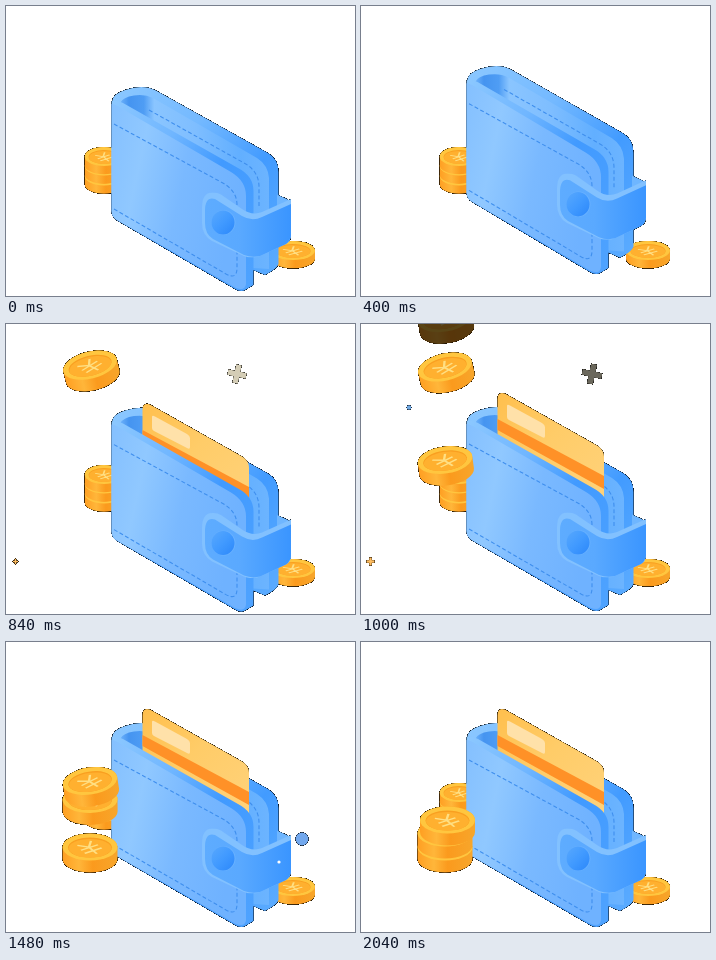
Recreate the animation shown at these times as an HTML page. Size 349 by 290 pixels, loop 3.04 s.

```html
<!DOCTYPE html>
<html lang="en">
<head>
<meta charset="utf-8">
<title>Wallet and coins</title>
<style>
  html, body { margin: 0; width: 100%; height: 100%; overflow: hidden; background: #fff; }
  svg { display: block; width: 349px; height: 290px; }
  .stitch { fill: none; stroke: #3f8fee; stroke-width: 1.1; stroke-dasharray: 4 2.4; }
</style>
</head>
<body>
<svg viewBox="0 0 349 290">
  <defs>
    <!-- Puts black under every partly transparent pixel: dark rims and dark fades. -->
    <filter id="matte" filterUnits="userSpaceOnUse" x="0" y="0" width="349" height="290" color-interpolation-filters="sRGB">
      <feComponentTransfer in="SourceAlpha" result="black">
        <feFuncA type="discrete" tableValues="0 1 1 1 1 1 1 1 1 1"/>
      </feComponentTransfer>
      <feMerge><feMergeNode in="black"/><feMergeNode in="SourceGraphic"/></feMerge>
    </filter>
    <linearGradient id="face" x1="0" y1="0" x2="1" y2=".3">
      <stop offset="0" stop-color="#84c0ff"/><stop offset=".28" stop-color="#90c8ff"/>
      <stop offset=".6" stop-color="#7ab9ff"/><stop offset="1" stop-color="#6fb2ff"/>
    </linearGradient>
    <linearGradient id="back" x1="0" y1="0" x2="1" y2="1">
      <stop offset="0" stop-color="#8cc8ff"/><stop offset=".35" stop-color="#74b9ff"/>
      <stop offset=".65" stop-color="#429bff"/><stop offset="1" stop-color="#5cacff"/>
    </linearGradient>
    <linearGradient id="inside">
      <stop offset="0" stop-color="#6db2fb"/><stop offset=".06" stop-color="#4594f0"/>
      <stop offset=".16" stop-color="#4f9df4"/><stop offset=".23" stop-color="#8ac5ff"/>
      <stop offset=".5" stop-color="#7fbeff"/><stop offset=".8" stop-color="#62afff"/>
      <stop offset="1" stop-color="#6cb4ff"/>
    </linearGradient>
    <linearGradient id="rim" x1="0" y1="0" x2="1" y2="1">
      <stop offset="0" stop-color="#8cc8ff"/><stop offset=".3" stop-color="#70b6ff"/>
      <stop offset=".55" stop-color="#419aff"/><stop offset="1" stop-color="#4fa3ff"/>
    </linearGradient>
    <linearGradient id="strap">
      <stop offset="0" stop-color="#5eacff"/><stop offset=".4" stop-color="#5aa9ff"/>
      <stop offset=".58" stop-color="#50a3ff"/><stop offset="1" stop-color="#3a95ff"/>
    </linearGradient>
    <linearGradient id="button" x1="0" y1="0" x2="1" y2="1">
      <stop offset="0" stop-color="#58a8fd"/><stop offset=".5" stop-color="#419aff"/>
      <stop offset="1" stop-color="#2b87fa"/>
    </linearGradient>
    <linearGradient id="card" x1="0" y1="0" x2="1" y2="1">
      <stop offset="0" stop-color="#ffbf4d"/><stop offset=".45" stop-color="#ffcc68"/>
      <stop offset="1" stop-color="#ffd27a"/>
    </linearGradient>
    <linearGradient id="side">
      <stop offset="0" stop-color="#ff9f22"/><stop offset=".3" stop-color="#ffb63a"/>
      <stop offset=".55" stop-color="#fb9a1d"/><stop offset="1" stop-color="#f7a62b"/>
    </linearGradient>
    <g id="coin">
      <path fill="url(#side)" d="M-27.500,0A27.500,13.500 0 0 1 27.500,0V12A27.500,13.500 0 0 1 -27.500,12Z"/>
      <ellipse rx="27.500" ry="13.500" fill="#ffc63f"/>
      <ellipse cy=".6" rx="22" ry="10" fill="#f99f20"/>
      <ellipse cy="1.3" rx="21.500" ry="9.300" fill="#ffb02f"/>
      <path transform="translate(0 1) scale(1 .52) rotate(-32)" fill="none" stroke="#ffdf83" stroke-width="2.4"
        d="M-8,-11L0,-2L8,-11M0,-2V13M-10,-1H10M-10,6H10"/>
    </g>
    <path id="cross" d="M-.3,-1H.3V-.3H1V.3H.3V1H-.3V.3H-1V-.3H-.3Z"/>
    <circle id="dot" r="1"/>
  </defs>

  <g filter="url(#matte)">
    <use href="#coin" transform="translate(98 170) scale(.7)"/>
    <use href="#coin" transform="translate(98 160) scale(.7)"/>
    <use href="#coin" transform="translate(98 150.5) scale(.7)"/>
    <use href="#coin" transform="translate(287 244.5) scale(.8 .7)"/>

    <g id="wallet">
      <path fill="url(#back)" d="M106,96Q106,88 119,84Q137,78 150,84.500L262,147Q272.500,153 272.500,166V258Q271,263 259,269L247,264L200,220L106,120Z"/>
      <path fill="url(#inside)" d="M114,97Q117,91 128,89.500Q139,88 147,92L251,152Q262,159 263,172V263L247,262L190,170Z"/>
      <path class="stitch" d="M143,104L238,157Q253,165 253,181V200"/>
      <g id="bankcard">
        <path fill="url(#card)" d="M136.500,73Q136.500,65 144,67.500L237,120Q243,124 243,131V174L136.500,114Z"/>
        <path fill="#ff9127" d="M136.500,93L243,150V163L136.500,104Z"/>
        <path fill="#ffe1a9" d="M146,80Q146,78 149,79.500L181,97Q184,99 184,101V110Q184,113 181,111L148,94Q146,93 146,91Z"/>
      </g>
      <path fill="url(#rim)" d="M106,95Q111,94 117,97L232,162Q247.500,170 247.500,185V279L240,283.500Q235,287 228,282.500L111,214.500Q105.500,211 105.500,205V95Z"/>
      <path fill="url(#face)" d="M105.500,98Q109,98 114,101.500L225,166Q240,175 240,190V278Q239,286 229,281.500L111,214Q105.500,211 105.500,205Z"/>
      <path class="stitch" d="M108,118L215,176Q231,184 231,199M108,203L220,268Q231,274 231,262V244"/>
      <path fill="#6fb6ff" d="M271,188.500L281,193Q285,195 285,201L271,207Z"/>
      <path fill="#82c1ff" d="M196,202Q196,186.500 206,186.500Q211,186 215,188.500L236,203Q246,210 256,206L285,193V230Q285,235 280,238L254,250Q246,253 238,250L206,235Q196,229 196,217Z" clip-path="inset(0 0 0 0)"/>
      <path fill="url(#strap)" d="M199,205Q199,190 209,193L236,210Q246,216 256,211L285,198V230Q284,235 280,238L254,250Q246,252 238,249L207,233Q199,228 199,217Z"/>
      <ellipse cx="217.500" cy="216.500" rx="12" ry="12.500" fill="#68b1ff"/>
      <ellipse cx="217" cy="216.500" rx="11.500" ry="12" fill="url(#button)"/>
      <use id="glint" href="#dot" fill="#fff" transform="translate(273 220) scale(1.6)"/>
    </g>

    <g id="falling"></g>
    <g id="sparkles"></g>
  </g>
</svg>
<script>
const LOOP = 3040;
const $ = id => document.getElementById(id);
const clamp = u => Math.min(1, Math.max(0, u));
const easeOut = u => 1 - (1 - u) ** 2;
const easeIn = u => u * u;
const smooth = u => u * u * (3 - 2 * u);

// Each key is [time, value, easing towards that value].
function track(t, keys) {
  const i = keys.findIndex(key => key[0] > t);
  if (i < 0) return keys[keys.length - 1][1];
  if (i === 0) return keys[0][1];
  const [t0, v0] = keys[i - 1], [t1, v1, ease = u => u] = keys[i];
  return v0 + (v1 - v0) * ease((t - t0) / (t1 - t0));
}

function addUse(parent, shape, fill) {
  const use = document.createElementNS('http://www.w3.org/2000/svg', 'use');
  use.setAttribute('href', '#' + shape);
  if (fill) use.setAttribute('fill', fill);
  return $(parent).appendChild(use);
}

const walletY = [[240, 0], [450, -18, easeOut], [740, 3, easeIn], [1000, 2], [1240, 0, smooth]];
const walletStretch = [[240, 1], [400, 1.02], [680, 1.022], [760, 1]];
const cardY = [[690, 52], [960, 0, easeOut]];

const coins = [
  { y: [[720, -30], [1000, 136], [1280, 195, easeOut], [1480, 205, smooth]],
    tilt: [[720, -18], [1000, -8], [1280, -3], [1480, 0]], x: [[0, 84]] },
  { y: [[860, -30], [1000, 43], [1280, 148], [1720, 170, smooth], [1960, 191, smooth]],
    tilt: [[1000, -13], [1280, 3], [1720, -5], [1960, 0]], x: [[0, 84]] },
  { y: [[920, -30], [1000, -6], [1280, 68], [1720, 169, easeOut], [1960, 178, smooth]],
    tilt: [[1000, -10], [1280, -12], [1720, -5], [1960, 0]], x: [[1720, 84], [1960, 86.5]] },
].map(coin => ({ ...coin, node: addUse('falling', 'coin') }));

const sparkles = [
  { shape: 'cross', fill: '#eee6cc', x: 231, y: 50, turn: 12,
    size: [[640, 0], [680, 4.5], [860, 10]], opacity: [[680, .9], [800, 1], [1000, .45], [1160, 0]] },
  { shape: 'cross', fill: '#ffbd60', x: 9.5, y: 237.5, turn: 0,
    size: [[640, 0], [680, 1.3], [1000, 4], [1280, 6.5]], opacity: [[640, .3], [720, 1], [1040, 1], [1280, .25], [1380, 0]] },
  { shape: 'dot', fill: '#70a9e4', x: 48, y: 83.5, turn: 0, ring: true,
    size: [[920, 0], [1000, 2.3], [1280, 5], [1480, 5.5]], opacity: [[1240, 1], [1480, 0]] },
  { shape: 'dot', fill: '#72a8ee', x: 296, y: 197, turn: 0,
    size: [[1240, 0], [1280, 1.5], [1640, 7.7, easeOut]], opacity: [[1560, 1], [1720, .75], [1840, 0]] },
].map(s => ({ ...s, node: addUse('sparkles', s.shape, s.fill), core: s.ring && addUse('sparkles', 'dot', '#e4f1fa') }));

function draw(t) {
  const stretch = track(t, walletStretch);
  $('wallet').setAttribute('transform', `translate(0 ${track(t, walletY) + 285 * (1 - stretch)}) scale(1 ${stretch})`);
  $('bankcard').setAttribute('transform', `translate(0 ${track(t, cardY)})`);
  $('bankcard').style.display = t < 690 ? 'none' : '';
  $('glint').style.opacity = track(t, [[1220, 0], [1280, 1], [1480, 1], [1800, 0]]);

  for (const { node, x, y, tilt } of coins) {
    const top = track(t, y);
    node.setAttribute('transform', `translate(${track(t, x)} ${top}) rotate(${track(t, tilt)})`);
    node.style.opacity = .35 + .65 * clamp((top + 6) / 36);
  }

  for (const { node, core, x, y, turn, size, opacity } of sparkles) {
    const radius = track(t, size), alpha = track(t, opacity);
    const place = r => `translate(${x} ${y}) rotate(${turn}) scale(${r})`;
    node.setAttribute('transform', place(radius));
    node.style.opacity = alpha;
    if (core) {
      core.setAttribute('transform', place(radius > 3 ? radius * .45 : 0));
      core.style.opacity = alpha;
    }
  }
}

const start = performance.now();
function frame() {
  const elapsed = (performance.now() - start) % LOOP;
  draw(Math.floor(elapsed / 40) * 40);
  requestAnimationFrame(frame);
}
frame();
</script>
</body>
</html>
```
